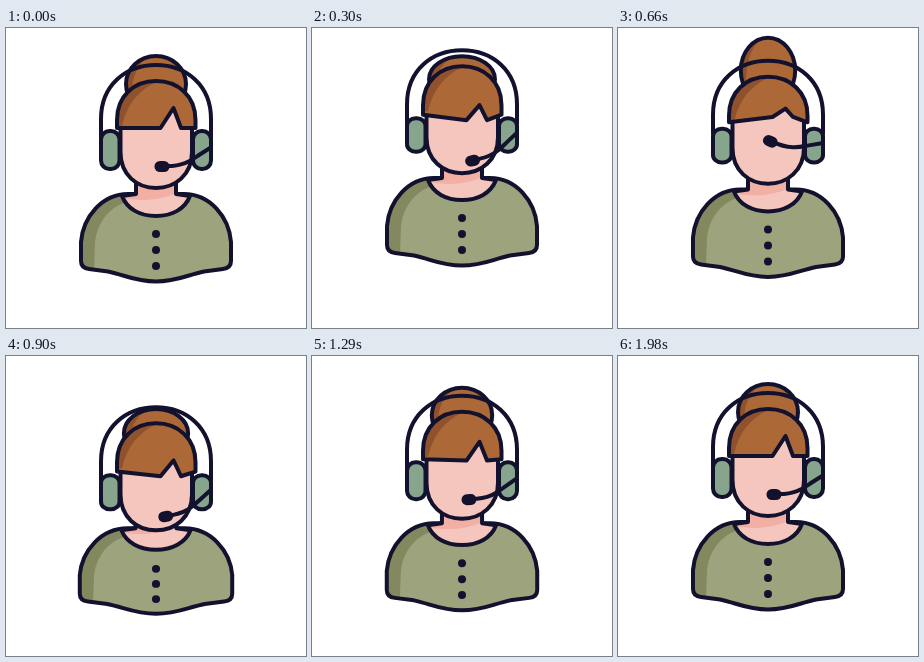
These frames come from a looping animation (300 by 300 pixels, 4040 ms). An HTML page:

```html
<!DOCTYPE html>
<html lang="en">
<head>
<meta charset="utf-8">
<title>Support agent</title>
<style>
  html, body { margin: 0; width: 100%; height: 100%; overflow: hidden; background: #fff; }
  svg { display: block; width: 100vw; height: 100vh; }
  svg * { vector-effect: non-scaling-stroke; }
  .line { stroke: #12122f; stroke-width: 4; stroke-linecap: round; stroke-linejoin: round; }
  .none { fill: none; }
  .ink { fill: #12122f; }
  .skin { fill: #f5c6be; }
  .skin-shade { fill: #f2afa3; }
  .hair { fill: #ad6837; }
  .hair-shade { fill: #8f522c; }
  .shirt { fill: #9da37c; }
  .shirt-shade { fill: #83885f; }
  .cup { fill: #86a58c; }
</style>
</head>
<body>
<svg viewBox="0 0 300 300">
  <defs>
    <path id="torso" d="M75 233V214C77 189 96 166 122 166H178C204 166 223 189 225 214V233Q225 240 217 241L198 243.500C181 247 171 253.500 150 253.500S119 247 102 243.500L83 241Q75 240 75 233Z"/>
  </defs>
  <g id="body">
    <use href="#torso" class="shirt"/>
    <path class="shirt-shade" d="M75 233V214C77 189 96 166 120 166L121 174C102 179 90 197 89 216L88 241.500L83 241Q75 240 75 233Z"/>
    <use href="#torso" class="line none"/>
    <path class="skin" d="M130 135V166L116 168C121 181 134 188 150 188S179 181 184 168L170 166V135Z"/>
    <path class="skin-shade" d="M130 135H170V165Q158 171 138 172L119 171L130 166Z"/>
    <path class="line none" d="M130 135V166L116 168C121 181 134 188 150 188S179 181 184 168L170 166V135"/>
    <g class="ink" id="buttons">
      <circle cx="150" cy="206" r="4"/>
      <circle cx="150" cy="222" r="4"/>
      <circle cx="150" cy="238" r="4"/>
    </g>
  </g>
  <g id="head">
    <g id="bun">
      <ellipse class="hair" rx="30" ry="28"/>
      <path class="hair-shade" d="M-24 17A30 28 0 0 1 -8 -27C-20 -18 -25 -5 -24 17Z"/>
      <ellipse class="line none" rx="30" ry="28"/>
    </g>
    <path class="line none" d="M95 110V91C95 57 120 37 150 37S205 57 205 91V110"/>
    <path class="line skin" d="M114.500 90V124C114.500 147 131 160 150 160S186 147 186 124V90L168 72Z"/>
    <path class="hair" id="hair"/>
    <path class="hair-shade" d="M111 98V92C111 71 125 54 150 54C133 62 121 76 116 98Z"/>
    <path class="line none" id="hairLine"/>
    <g class="line cup" id="cups">
      <rect x="95" y="103" width="18.500" height="38" rx="8.500"/>
      <rect x="187" y="103" width="18" height="38" rx="8.500"/>
    </g>
    <g id="mic">
      <path class="line none" d="M158 138C178 139 187 131 193 127L204 120"/>
      <rect class="ink" x="148.500" y="133" width="15" height="11" rx="5.500"/>
    </g>
  </g>
</svg>
<script>
const LOOP = 4040, STEP = 30, REST = 1980;

// Turning points of the bounce: [ms, vertical offset]
const bounce = [[0, 0], [150, 7], [410, -30], [820, 8], [1020, -3], [1220, 1.5], [1400, -0.6], [1700, 0]];

const byId = id => document.getElementById(id);
const place = (id, transform) => byId(id).setAttribute('transform', transform);
const scaleAt = (x, y, sx, sy) => `translate(${x} ${y}) scale(${sx} ${sy}) translate(${-x} ${-y})`;
const buttons = [...byId('buttons').children].map(el => ({ el, y: +el.getAttribute('cy') }));

function height(t) {
  const next = bounce.findIndex(([time]) => time > t);
  if (next < 1) return 0;
  const [t0, y0] = bounce[next - 1], [t1, y1] = bounce[next];
  return y0 + (y1 - y0) * (1 - Math.cos(Math.PI * (t - t0) / (t1 - t0))) / 2;
}

function draw(t) {
  const body = height(t);
  const squash = Math.max(0, body) / 260;
  // The head sinks into the collar just after each landing.
  const head = 0.93 * body + 1.35 * Math.max(0, height(t - 60));
  // Loose parts trail the motion: positive while falling, negative while rising.
  const speed = t > 0 ? (height(t + 5) - height(t - 5)) / 10 : 0;
  const swing = Math.tanh(15 * speed);
  const drag = Math.abs(swing);

  place('body', `translate(0 ${body}) ` + scaleAt(150, 253.5, 1 + squash, 1 - 1.5 * squash));
  for (const { el, y } of buttons) el.setAttribute('cy', y + 2 * squash * (253.5 - y));

  place('head', `translate(0 ${head})`);
  const stretch = swing * drag;
  place('bun', `translate(150 ${56 - 10 * stretch}) scale(${1 - 0.1 * stretch} ${1 + 0.18 * stretch})`);
  place('cups', scaleAt(150, 121, 1, 1 - 0.12 * drag));
  place('mic', `rotate(${swing * (swing > 0 ? 24 : 11)} 205 119)`);

  const side = 100 - 1.5 * swing, valley = 100 - 7 * swing;
  const notch = 80 + 8.5 * drag - 3.5 * swing;
  const outline = `M111 ${side}V92C111 68 128 53 150 53S189.500 68 189.500 92V${side}`
    + `L175 ${valley}L167.500 ${notch}L154.500 ${valley}Z`;
  byId('hair').setAttribute('d', outline);
  byId('hairLine').setAttribute('d', outline);
}

const start = performance.now();
function frame() {
  const t = (performance.now() - start) % LOOP;
  draw(Math.min(REST, Math.floor(t / STEP) * STEP));
  requestAnimationFrame(frame);
}
frame();
</script>
</body>
</html>
```
